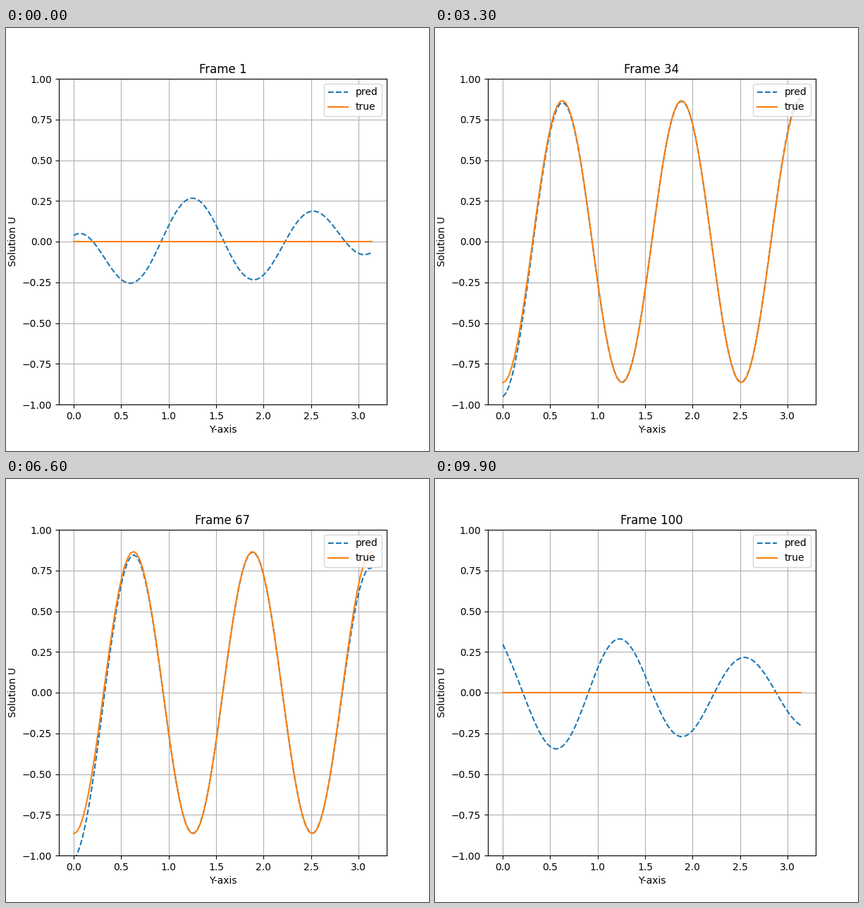
Write a matplotlib script that moves like this. It is 600 px wide and 600 px high and loops after 10 s.

```python
import numpy as np
import matplotlib.pyplot as plt
from matplotlib.animation import FuncAnimation

FRAMES = 100
y = np.linspace(0, np.pi, 100)
gap = np.pi - y  # distance to the right boundary

# Residual waves at the first and last x, fading towards the middle
first_amp = ((.355 - .062 * y) * (1 - .85 * np.exp(-y / .4))
             * (1 - .58 * np.exp(-gap / .25)))
first_err = first_amp * np.cos(5 * y - .2 + .98 * np.exp(-y / .8))
last_amp = .277 + .07 * np.cos(1.45 * (y - .75)) + .058 * np.exp(-y / .15)
last_err = last_amp * np.cos(5 * y - .55 + 1.18 * np.exp(-y / 2))

# Error profiles along the two y boundaries
left = np.exp(-y / .28)
right = np.exp(-(gap / .2) ** 1.3)


def true_u(t):
    return np.sin(5 * np.pi * t) * np.cos(5 * y)


def pred_u(t):
    phase = 5 * np.pi * t
    a = np.sin(np.pi * t ** 1.2) * (.14 * np.sin(phase + .4) - .032)
    b = .21 * t * (1 - t ** 20) * np.sin(phase + 1.3)
    ends = first_err * np.exp(-13 * t) + last_err * np.exp(-14 * (1 - t))
    return true_u(t) + ends + a * left + b * right


fig, ax = plt.subplots(figsize=(6, 6), dpi=100)
pred_line, = ax.plot(y, pred_u(0), "--", label="pred")
true_line, = ax.plot(y, true_u(0), label="true")
ax.set_ylim(-1, 1)
ax.set_xlabel("Y-axis")
ax.set_ylabel("Solution U")
ax.grid(True)
ax.legend(loc="upper right")
title = ax.set_title("Frame 1")


def update(i):
    t = i / (FRAMES - 1)
    pred_line.set_ydata(pred_u(t))
    true_line.set_ydata(true_u(t))
    title.set_text(f"Frame {i + 1}")
    return pred_line, true_line, title


anim = FuncAnimation(fig, update, frames=FRAMES, interval=100, repeat=True)
plt.show()
```
